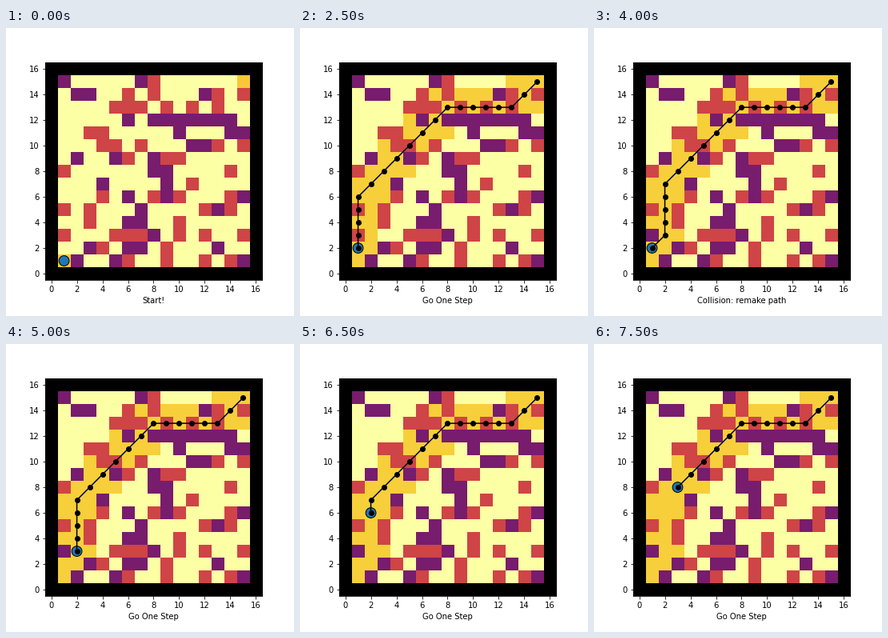
Write a matplotlib script that moves like this. It is 360 px wide and 360 px high and loops after 8 s.

```python
import matplotlib.pyplot as plt
import numpy as np
from matplotlib.animation import FuncAnimation
from matplotlib.colors import to_rgb
from matplotlib.patches import Circle

SIZE = 17
WALL, FREE, ROUGH, HARD, SEEN = (
    to_rgb(c) for c in ("#000000", "#fcffa4", "#cf4446", "#781c6d", "#f6cf3a"))
ENDPOINT = to_rgb("#fbc738")
START, GOAL = (1, 1), (15, 15)

# Row -> columns holding each kind of terrain
HARD_CELLS = {
    15: [1, 7], 14: [2, 3, 12], 12: [6, *range(8, 15)], 11: [10, 14, 15],
    10: [11, 12], 9: [2, 5, 8], 8: [8, 9], 7: [4, 9], 6: [6, 9, 15],
    5: [7, 13], 4: [6, 7], 3: [8], 2: [3, 6, 7, 13], 1: [2, 5, 15],
}
ROUGH_CELLS = {
    15: [8], 14: [6, 8, 13, 15], 13: [5, 6, 7, 9, 11, 13], 11: [3, 4],
    10: [4, 5, 7, 13, 15], 9: [6, 9, 10], 8: [1, 14], 7: [11],
    6: [4, 8, 10, 14], 5: [1, 3, 12, 14], 4: [3, 10],
    3: [1, 5, 6, 7, 10, 12, 15], 2: [4, 9], 1: [6, 9, 12, 14],
}

TAIL = ([(x, x + 5) for x in range(2, 9)]
        + [(x, 13) for x in range(9, 14)] + [(14, 14), GOAL])
FIRST_PATH = [(1, y) for y in range(1, 7)] + TAIL
NEW_PATH = [(1, 2)] + [(2, y) for y in range(3, 7)] + TAIL


def build_terrain():
    grid = np.full((SIZE, SIZE, 3), FREE)
    for color, cells in ((HARD, HARD_CELLS), (ROUGH, ROUGH_CELLS)):
        for row, columns in cells.items():
            grid[row, columns] = color
    grid[[0, -1]] = WALL
    grid[:, [0, -1]] = WALL
    return grid


def explore(grid, path):
    """Mark the free cells on and around a path."""
    grid = grid.copy()
    for x, y in path:
        near = grid[y - 1:y + 2, x - 1:x + 2]
        near[(near == FREE).all(axis=2)] = SEEN
    return grid


terrain = build_terrain()
first_map = explore(terrain, FIRST_PATH)
new_map = explore(first_map, NEW_PATH)
new_map[3, 1] = HARD
start_map = terrain.copy()
for x, y in (START, GOAL):
    start_map[y, x] = ENDPOINT


def state(tick):
    """Return caption, map, path and robot position for a half-second tick."""
    if tick < 1:
        return "Start!", start_map, [], START
    if tick < 5:
        return "Initial path", first_map, FIRST_PATH, START
    if tick < 10:
        caption = "Go One Step" if tick < 6 else "Collision: remake path"
        if tick < 8:
            return caption, first_map, FIRST_PATH[1:], FIRST_PATH[1]
        return caption, new_map, NEW_PATH, NEW_PATH[0]
    rest = NEW_PATH[tick - 9:]
    return "Go One Step", new_map, rest, rest[0]


plt.rcParams.update({"font.family": "DejaVu Sans", "font.size": 10})
fig, ax = plt.subplots(figsize=(5, 5), dpi=72)
fig.subplots_adjust(left=0.125, right=0.9, bottom=0.125, top=0.88)
image = ax.imshow(start_map, origin="lower", interpolation="nearest")
robot = ax.add_patch(Circle(START, 0.4, facecolor="#1f77b4", edgecolor="black"))
route, = ax.plot([], [], "ko-", linewidth=1.5, markersize=6)
ax.set(xlim=(-0.5, 16.5), ylim=(-0.5, 16.5),
       xticks=range(0, SIZE, 2), yticks=range(0, SIZE, 2))


def update(tick):
    caption, grid, path, position = state(tick)
    ax.set_xlabel(caption)
    image.set_data(grid)
    route.set_data([x for x, _ in path], [y for _, y in path])
    robot.center = position
    return image, route, robot


anim = FuncAnimation(fig, update, frames=16, interval=500, repeat=True)
plt.show()
```
